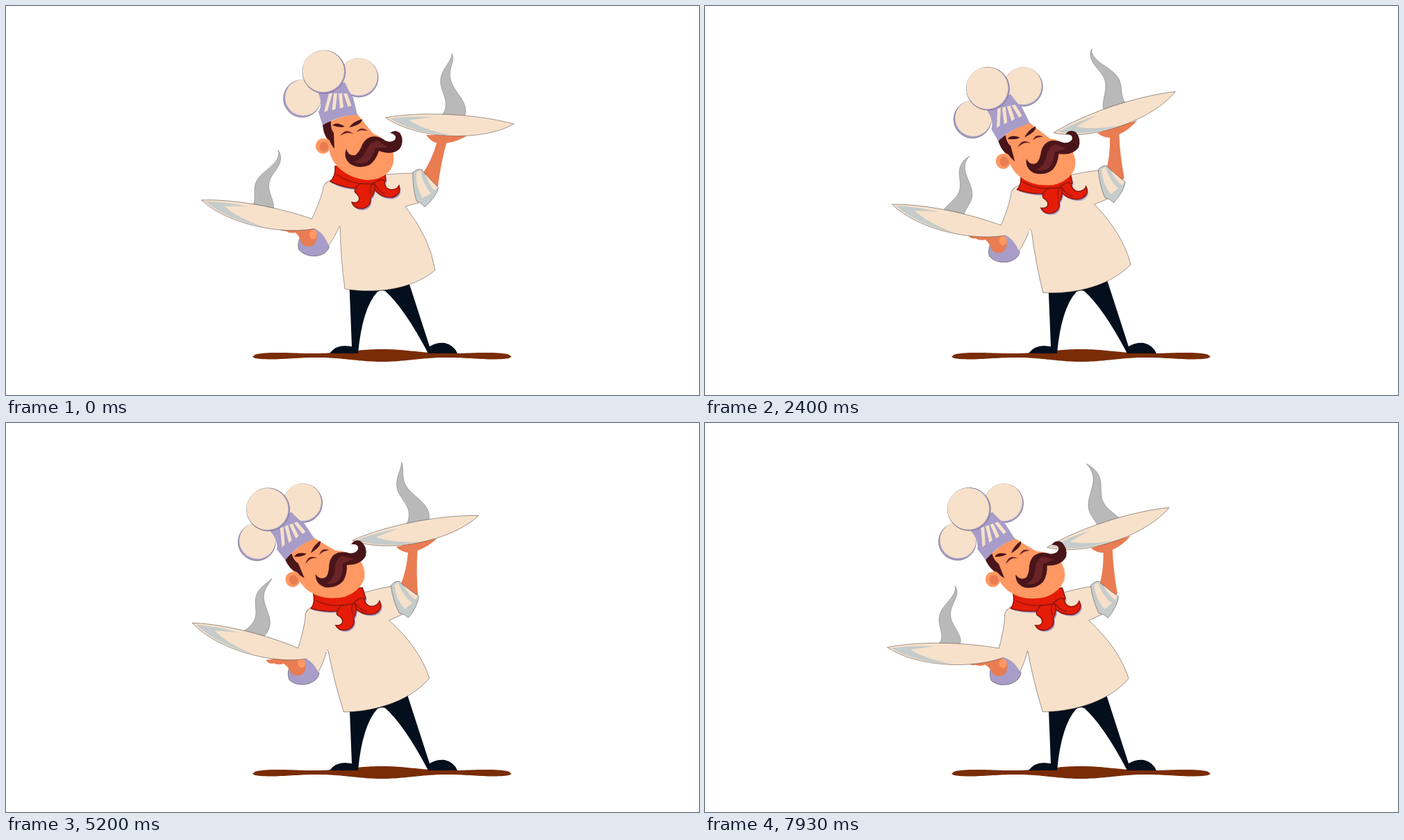
Animation, 998 px wide and 561 px high, one loop 8000 ms. Source, as an HTML page with a canvas:

```html
<!DOCTYPE html>
<html lang="en">
<head>
<meta charset="utf-8">
<title>Dancing chef</title>
<style>
html, body { margin: 0; width: 100%; height: 100%; overflow: hidden; background: #fff; }
canvas { display: block; width: 100%; height: 100%; }
</style>
</head>
<body>
<canvas id="stage" width="998" height="561"></canvas>
<script>
const ctx = document.getElementById('stage').getContext('2d');
const LOOP = 8000, BEAT = 3600;
const CREAM = '#f7e1ca', GRAY = '#c5cccb', LILAC = '#a79dc8', NAVY = '#030f1d';
const SKIN = '#ff9862', SKIN_DARK = '#e97c52', RED = '#e41c08', RED_DARK = '#8c170b';
const HAIR = '#491519', HAIR_LIGHT = '#6a2326', EDGE = 'rgba(50,40,45,.55)';

// Eased step from 0 to 1, and a cosine that is 1 at the peak time
const ease = u => (1 - Math.cos(Math.PI * Math.min(1, Math.max(0, u)))) / 2;
const wave = (t, period, peak) => Math.cos(2 * Math.PI * (t - peak) / period);

function pose(t) {
  const p = t % BEAT;
  const sway = ease((p - 100) / 720) - ease((p - 2065) / 800);
  return {
    lean: -9.8 * sway,
    dip: Math.sin(Math.PI * sway),
    arm: 2.6 - 2.2 * wave(t, BEAT, 500),
    leftTilt: -1.5 + 12 * ((1 + wave(t, BEAT, 1720)) / 2) ** 3,
    forearm: -5.8 + 4.8 * wave(t, BEAT / 2, 1550) + 2.3 * wave(t, BEAT, 300),
    leftPhase: 3.4 + 2 * Math.PI * t / 980,
    rightPhase: 4.7 + 2 * Math.PI * t / 1030
  };
}

function shape(d, fill, stroke, width = 0.8) {
  const p = new Path2D(d);
  if (fill) { ctx.fillStyle = fill; ctx.fill(p); }
  if (stroke) { ctx.strokeStyle = stroke; ctx.lineWidth = width; ctx.stroke(p); }
}

function polygon(points, fill, stroke) {
  shape('M' + points.map(p => p.join(' ')).join('L') + 'Z', fill, stroke);
}

function oval(x, y, rx, ry, fill, stroke) {
  ctx.beginPath();
  ctx.ellipse(x, y, rx, ry, 0, 0, 7);
  ctx.fillStyle = fill;
  ctx.fill();
  if (stroke) { ctx.strokeStyle = stroke; ctx.lineWidth = 0.7; ctx.stroke(); }
}

function moved(x, y, draw) {
  ctx.save();
  ctx.translate(x, y);
  draw();
  ctx.restore();
}

// Draws with everything turned by deg around a joint
function turned(x, y, deg, draw) {
  moved(x, y, () => {
    ctx.rotate(deg * Math.PI / 180);
    ctx.translate(-x, -y);
    draw();
  });
}

function steam(x, y, lean, height, base, phase) {
  const left = [], right = [];
  for (let h = 0; h < 1.01; h += 0.04) {
    const envelope = Math.max(0, Math.sin(Math.PI * h)) ** 0.6;
    const cx = x + lean * h + 10 * envelope * Math.sin(5 * h - phase);
    const half = base / 2 * Math.max(0, 1 - h) ** 0.95;
    left.push([cx - half, y - height * h]);
    right.unshift([cx + half, y - height * h]);
  }
  polygon(left.concat(right), '#b9b9b9', 'rgba(70,70,70,.4)');
}

// A dish whose left tip is at x, y
function plate(x, y, deg, drawSteam) {
  moved(x, y, () => {
    ctx.rotate(deg * Math.PI / 180);
    drawSteam();
    shape('M0 0C50 -12 130 -12 185 0C140 29 45 29 0 0Z', CREAM, EDGE);
    shape('M6 1Q32 -4 68 -4Q44 0 34 2Q52 14 96 21Q40 20 6 1Z', GRAY);
  });
}

function ground() {
  const top = [], bottom = [];
  for (let u = 0; u < 1.001; u += 0.01) {
    const x = 355 + 373 * u;
    const end = Math.max(0, Math.sin(Math.PI * u)) ** 0.35;
    const swell = Math.cos(4 * Math.PI * u);
    top.push([x, 506 - end * (8.3 + 2.7 * swell)]);
    bottom.unshift([x, 506 + end * (4 + 3 * swell)]);
  }
  polygon(top.concat(bottom), '#792c05');
}

function legs() {
  shape('M494 392L578 392L610 491Q620 485 632 486Q645 489 650 501L608 501Q574 436 546 411' +
    'Q541 409 535 412Q513 436 507 501L466 501Q474 490 488 490L498 491L496 440Z', NAVY);
}

function torso() {
  shape('M470 250Q458 254 458 264Q468 300 481 318Q482 365 488 408C522 414 580 413 618 381' +
    'Q611 335 575 289L594 284L590 241Q568 241 548 243L520 250Z', CREAM, EDGE);
}

function rightArm({ forearm, lean, rightPhase }) {
  turned(605, 258, forearm, () => {
    shape('M600 242Q613 224 621 198Q612 195 606 186L666 187Q652 196 635 198Q627 225 622 260L610 266Z', SKIN_DARK);
    turned(630, 186, 0.2 * (forearm + lean), () =>
      plate(548, 160, 3.7, () => steam(96, -7, -5, 90, 33, rightPhase)));
  });
  shape('M586 240Q592 234 599 236Q604 244 623 262Q619 276 603 290Q599 284 591 281Q585 260 586 240Z', GRAY, EDGE);
  shape('M591 240L597 237Q600 257 612 270L600 277Q590 262 591 240ZM604 243L622 262L617 266Q608 256 604 243Z', CREAM);
}

function scarf() {
  const collar = 'M474 231L545 236L547 252Q535 262 505 263Q485 262 467 253Q475 246 474 231Z';
  const right = 'M528 256Q542 247 545 253Q545 263 554 265Q563 265 566 259Q570 272 556 276Q540 277 530 264Z';
  const left = 'M510 256Q500 264 503 269Q511 275 508 281Q505 285 498 283Q501 293 514 292Q526 289 525 277Q532 270 531 257Z';
  const parts = [collar, right, left];
  moved(1.5, 2.5, () => parts.forEach(d => shape(d, LILAC)));
  parts.forEach(d => shape(d, RED, RED_DARK, 1.5));
  shape('M476 243Q495 256 514 256M527 257Q523 265 525 272M531 257Q537 268 546 271', null, RED_DARK, 1.3);
}

function puff(x, y, r, dx, dy) {
  oval(x + dx, y + dy, r + 1, r + 1, LILAC, EDGE);
  oval(x, y, r, r, CREAM);
}

function hat() {
  puff(428, 132, 26, -1.5, 1.5);
  puff(508, 102, 27, 0, 1.5);
  shape('M446 116L488 110Q496 128 500 132L506 157Q478 158 456 172L450 153Q458 140 446 116Z', LILAC);
  for (let i = 0; i < 4; i++) {
    const top = 465 + 7 * i, foot = 458 + 11.5 * i, y = 153 - 2.5 * i;
    polygon([[top, 126], [top + 5, 126], [foot + 5, y - 2], [foot, y]], CREAM);
  }
  puff(457, 94, 30, 0.8, 1);
}

function head() {
  oval(456.5, 202, 10.5, 11, SKIN);
  oval(458, 203, 6.5, 7, SKIN_DARK);
  shape('M456 172Q480 158 506 156Q516 169 529 184Q545 190 556 206Q562 222 554 236Q542 251 519 251' +
    'Q488 247 473 226Q466 216 465 205Z', SKIN);
  shape('M456 170L468 166Q467 177 472 183L473 206Q468 200 466 194Q457 188 456 170Z', HAIR);
  hat();
  shape('M470 172Q476 166 488 174Q480 176 470 172ZM494 175Q501 166 513 163Q513 171 494 175Z', HAIR);
  shape('M484 185Q490 178 497 183Q491 181 484 185ZM507 180Q512 175 518 179Q512 178 507 180Z', HAIR_LIGHT, HAIR_LIGHT, 1.3);
  shape('M490 206Q493 217 503 215Q509 211 513 200Q519 188 531 188Q540 189 546 194Q554 198 560 193' +
    'Q564 186 553 183Q561 177 568 184Q574 195 567 206Q556 216 537 209Q533 222 524 229' +
    'Q510 236 496 228Q485 219 490 206Z', HAIR);
  shape('M500 224Q514 222 519 208Q524 196 535 194Q543 199 549 204L532 205Q528 219 520 225Q511 230 500 224Z', HAIR_LIGHT);
}

function leftArm({ leftTilt, leftPhase }) {
  shape('M430 325Q420 340 423 352Q432 363 450 361Q464 358 467 348Q462 330 446 320Z', LILAC, EDGE);
  shape('M393 320Q396 327 404 326Q410 330 418 328Q424 333 427 343Q432 349 442 347Q450 341 449 331L442 319Z', SKIN_DARK);
  oval(443.5, 330, 5.5, 7, SKIN);
  turned(430, 328, leftTilt, () =>
    plate(283, 280, 11.5, () => steam(89, -8, 5, 84, 30, leftPhase)));
  shape('M472 252Q456 254 456 267Q451 286 441 308L444 321Q459 327 466 346Q476 331 481 318L492 275Z', CREAM);
  shape('M462 254Q456 258 456 267Q451 286 441 308M466 346Q476 331 481 318', null, EDGE);
}

function draw(t) {
  const p = pose(t);
  ctx.fillStyle = '#fff';
  ctx.fillRect(0, 0, 998, 561);
  ground();
  legs();
  turned(538, 422, p.lean, () => {
    torso();
    rightArm(p);
    turned(475, 272, p.arm, () => leftArm(p));
    moved(0, 3.5 * p.dip, scarf);
    moved(0, 9 * p.dip, () => turned(482, 252, p.lean * 1.04, head));
  });
}

// Motion advances fifteen times a second
function tick() {
  const t = performance.now() % LOOP;
  draw(Math.floor(t * 0.015 + 0.06) / 0.015 % LOOP);
  requestAnimationFrame(tick);
}
tick();
</script>
</body>
</html>
```
